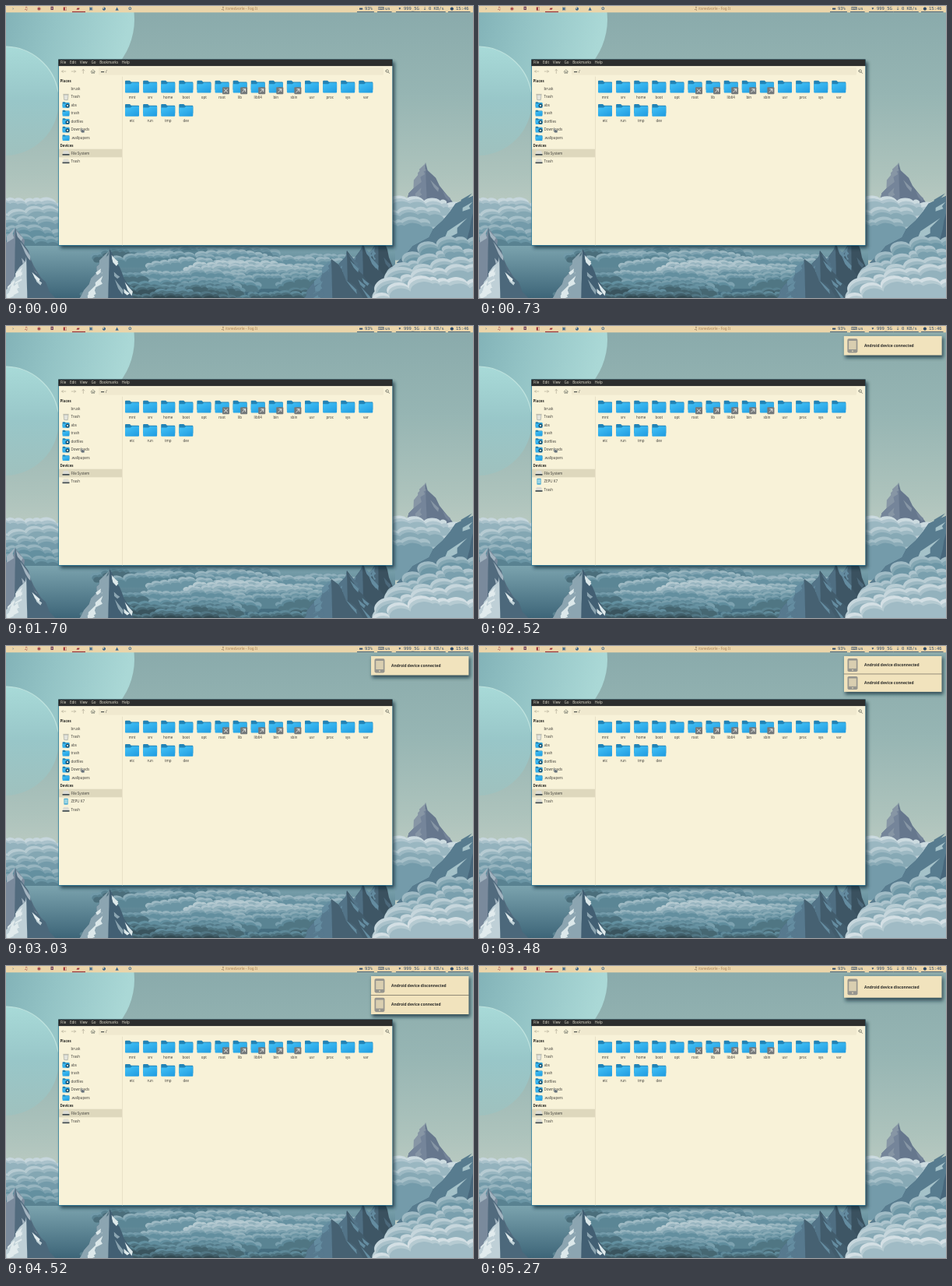
An HTML page that plays this animation: 600 by 375 pixels, repeating every 5.3 s.

```html
<!DOCTYPE html>
<html lang="en">
<head>
<meta charset="utf-8">
<title>File manager on a desktop</title>
<style>
  html, body { margin: 0; width: 100%; height: 100%; overflow: hidden; background: #90b1b1; }
  svg { display: block; width: 100vw; height: 100vh; }
  text { font-family: "Noto Sans", "Open Sans", sans-serif; font-size: 4.5px; fill: #46453f; white-space: pre; }
  .mono { font-family: "DejaVu Sans Mono", "Noto Sans Mono", monospace; font-size: 5.5px; fill: #334e6c; }
  .glyph { font-family: "DejaVu Sans", sans-serif; font-size: 5.5px; text-anchor: middle; }
  .bold { font-weight: 700; fill: #292925; }
  .menu { fill: #d9d5c4; word-spacing: 3.6px; }
  .song { font-size: 4.7px; fill: #a88058; }
  .note { font-weight: 700; font-size: 4.95px; fill: #2c2c2a; }
</style>
</head>
<body>
<svg viewBox="0 0 600 375" preserveAspectRatio="none">
  <defs>
    <linearGradient id="sky" x2="0" y2="1">
      <stop offset="0" stop-color="#89aaab"/><stop offset=".3" stop-color="#96b5b3"/>
      <stop offset=".58" stop-color="#adc3bc"/><stop offset=".75" stop-color="#c0cdc4"/>
    </linearGradient>
    <linearGradient id="planet" x1=".95" y1=".6" x2=".1" y2=".4">
      <stop offset="0" stop-color="#aad8d6"/><stop offset=".6" stop-color="#93c3c5"/><stop offset="1" stop-color="#83b3b8"/>
    </linearGradient>
    <linearGradient id="moon" x2="0" y2="1">
      <stop offset="0" stop-color="#a8dad8"/><stop offset=".5" stop-color="#98c6c8"/><stop offset="1" stop-color="#9fc1be"/>
    </linearGradient>
    <linearGradient id="sea" x2="0" y2="1">
      <stop offset="0" stop-color="#7ba3ae"/><stop offset="1" stop-color="#3d6578"/>
    </linearGradient>
    <linearGradient id="front" x2=".7" y2="1">
      <stop offset="0" stop-color="#45c4f8"/><stop offset="1" stop-color="#239fe2"/>
    </linearGradient>
    <filter id="blur" x="-20%" y="-20%" width="140%" height="140%"><feGaussianBlur stdDeviation="2.2"/></filter>
    <g id="folder">
      <path d="M-9-7q0-1 1-1h5l1.8 1.7H8q1 0 1 1v9H-9z" fill="#2283b5"/>
      <path d="M-9-3.5h7l2-1.8h8q1 0 1 1v11q0 1-1 1H-8q-1 0-1-1z" fill="url(#front)"/>
    </g>
    <g id="phone">
      <rect x="4.5" y="3.2" width="13" height="18.2" rx="1.8" fill="#96958e"/>
      <path d="M6.2 6h9.6v11H6.2z" fill="#d9ceb0"/><circle cx="11" cy="19.2" r="1" fill="#d9ceb0"/>
    </g>
    <g id="disk"><path d="M-3-3h6l1.5 4h-9z" fill="#dcdcd4"/><path d="M-4.5 1h9v1.7h-9z" fill="#3e494f"/></g>
    <g id="trash"><path d="M-3-2.5h6l-.7 6.5h-4.6zM-3.8-3.2h7.6" fill="#e2e3dc" stroke="#8f938c" stroke-width=".5"/></g>
  </defs>
  <g id="wallpaper"></g>
  <g id="topbar"></g>
  <g id="window"></g>
  <g id="stack"></g>
</svg>
<script>
const $ = id => document.getElementById(id);
const LOOP = 5300, CONNECT = 2050, DISCONNECT = 3260, EXPIRE = 5052;
const ROW = 24.5, INK = '#334e6c', RED = '#9a3038';

const path = (d, fill, extra = '') => `<path d="${d}" fill="${fill}" ${extra}/>`;
const line = (d, color, width = .7) => path(d, 'none', `stroke="${color}" stroke-width="${width}" stroke-linecap="round"`);
const rect = (x, y, w, h, fill, extra = '') => `<rect x="${x}" y="${y}" width="${w}" height="${h}" fill="${fill}" ${extra}/>`;
const circle = (x, y, r, fill) => `<circle cx="${x}" cy="${y}" r="${r}" fill="${fill}"/>`;
const text = (x, y, s, attrs = '') => `<text x="${x}" y="${y}" ${attrs}>${s}</text>`;
const glyph = (x, y, s, color) => text(x, y, s, `class="glyph" style="fill:${color}"`);
const use = (id, x, y, scale = 1) => `<use href="#${id}" transform="translate(${x} ${y}) scale(${scale})"/>`;
const poly = (points, fill) => `<polygon points="${points.join(' ')}" fill="${fill}"/>`;
const shadow = (x, y, w, h) => rect(x, y, w, h, '#102b39', 'opacity=".72" filter="url(#blur)"');
const tone = (light, hue = 196, sat = 24) => `hsl(${hue} ${sat}% ${light}%)`;

function random(seed) {
  return () => (seed = seed * 16807 % 2147483647) / 2147483647;
}

// A scalloped heap of cloud, tapering to both ends.
function heap(x0, x1, y, depth, puff, color, seed) {
  const rnd = random(seed);
  let x = x0, cy = y + depth, d = `M${x} ${cy}`;
  while (x < x1) {
    const w = Math.min(puff * (.4 + rnd()), x1 - x + .1);
    const u = Math.min(1, (x + w - x0) / (x1 - x0));
    const next = y + depth * (1 - Math.max(0, Math.sin(Math.PI * u)) ** .4) + (rnd() - .5) * puff * .4;
    d += `a${w * .62} ${w * .42} 0 0 1 ${w} ${next - cy}`;
    x += w;
    cy = next;
  }
  return path(d + `V${y + depth}H${x0}z`, color);
}

// A heap with a bright rim and a darker foot.
function cloud(x0, x1, y, depth, puff, light, seed) {
  return [9, 0, -7].map((lift, i) => heap(x0 + i * 2, x1 - i, y + i * (1 + puff * .15), depth, puff, tone(light + lift), seed)).join('');
}

function slope(x, y, dx, base, rnd, steps = 9) {
  return Array.from({ length: steps + 1 }, (_, i) => {
    const t = i / steps;
    return [x + dx * (t + (i ? rnd() - .5 : 0) * .15), y + (base - y) * t];
  });
}

// A jagged peak: dark body, lit left face and streaks of snow running down both sides.
function peak(x, y, left, right, base, body, lit, snow, seed) {
  const rnd = random(seed);
  const west = slope(x, y, -left, base, rnd), ridge = slope(x, y, (right - left) * .25, base, rnd), east = slope(x, y, right, base, rnd);
  let s = poly([...west, ...[...east].reverse()], body) + poly([...west, ...[...ridge].reverse()], lit);
  for (let i = 0; i < 12; i++) {
    const t = rnd() * .75, side = rnd() < .6 ? -left : right;
    const sx = x + side * t * (.3 + rnd() * .65), sy = y + (base - y) * t;
    const run = (base - y) * (.12 + rnd() * .2), drift = side / (base - y) * run;
    s += poly([[sx, sy], [sx + drift * .5 + 2, sy + run * .45], [sx + drift * .6 + 5, sy + run * .7],
      [sx + drift, sy + run], [sx + drift * .75 - 3, sy + run * .6]], i % 3 ? snow : lit);
  }
  return s;
}

function drawWallpaper() {
  let s = rect(0, 0, 600, 375, 'url(#sky)');
  s += circle(75, 17, 90, 'url(#planet)') + circle(-2, 122, 70, 'url(#moon)');
  s += line('M-2 52A70 70 0 0 1 67 110', '#bfe3de', 1.2);

  const rnd = random(29);
  for (let i = 0; i < 5; i++) s += cloud(-50, 95 + rnd() * 40, 248 + i * 12, 40, 17, 73 - i * 5, 40 + i);

  s += peak(539, 201, 46, 58, 290, '#66778d', '#75859a', '#8796a5', 8);
  for (let i = 0; i < 3; i++) s += cloud(470, 590 - i * 15, 248 + i * 13, 45, 18, 75 - i * 6, 60 + i);
  s += peak(606, 232, 104, 30, 330, '#48677c', '#587c8f', '#a5c2c9', 14);

  s += rect(0, 308, 500, 67, 'url(#sea)');
  for (let i = 0; i < 30; i++) {
    const y = 308 + i * 2.1, x = 95 + rnd() * 260, w = 60 + rnd() * 120;
    s += cloud(x, x + w, y, 12, 11, 64 - Math.abs(y - 326) * .65 - Math.abs(x + w / 2 - 300) * .06 + rnd() * 7, 100 + i);
  }

  s += peak(12, 284, 50, 45, 375, '#526b7e', '#7a8a9c', '#a3b4c0', 21);
  s += peak(26, 322, 34, 40, 380, '#4c687b', '#bfd0d7', '#e1ebed', 5);
  s += peak(133, 312, 42, 34, 380, '#425f73', '#8ca5b1', '#dce8ea', 33);

  for (let i = 0; i < 4; i++) {
    s += peak(478 - i * 20, 292 + i * 11, 42, 48, 385, tone(30 + i * 2, 203), tone(39 + i * 2, 203), tone(51, 200), 70 + i);
  }
  for (let i = 0; i < 5; i++) s += cloud(505 - i * 10, 690, 298 + i * 13, 62, 21, 61 + i * 4, 80 + i);
  $('wallpaper').innerHTML = s;
}

function drawTopbar() {
  let s = rect(0, 0, 600, 8.3, '#ebd5aa');
  [...'›♫◉◘◧▰▣◕▲✿'].forEach((icon, i) => {
    const color = [1, 2, 4, 5].includes(i) ? RED : i === 3 ? '#693d5a' : '#3b668d';
    s += glyph(9 + i * 16.7, 5.4, icon, color);
  });
  s += rect(85, 6.9, 17, 1.2, RED);
  s += glyph(278.5, 5.4, '♫', '#79604d') + text(282, 5.2, 'itsnedvorle - Fog It', 'class="song"');

  const status = [[461, '▬', '93%'], [487, '⌨', 'us'], [511, '▾', '999_5G'], [543, '↓', '0 KB/s'], [578, '●', '15:46']];
  for (const [x, icon, label] of status) {
    s += glyph(x - 5, 5.3, icon, INK) + text(x, 5.3, label, 'class="mono"');
    s += rect(x - 10, 7, label.length * 3.3 + 12, 1.1, '#48657b');
  }
  $('topbar').innerHTML = s;
}

function emblem(x, y, kind) {
  const mark = kind === 'x' ? 'M-2-2l4 4m0-4l-4 4' : 'M-2 2l4-4m-3 0h3v3';
  return `<g transform="translate(${x} ${y})">${rect(-4.5, -4.5, 9, 9, '#74797b', 'rx="1"')}${line(mark, '#f1f1eb', .9)}</g>`;
}

function drawWindow() {
  let s = shadow(70, 72, 429.5, 239);
  s += rect(67.3, 68.5, 429.2, 239.2, '#2a7c9f') + rect(68, 77, 428.3, 230, '#f8f2d8');
  s += rect(67.3, 68.5, 429.2, 8.6, '#2d2e2d');
  s += text(70, 74.4, 'File Edit View Go Bookmarks Help', 'class="menu"');

  const arrow = 'M-2.5 0h5m-5 0l1.5-1.5m-1.5 1.5l1.5 1.5';
  [0, 180, 90].forEach((angle, i) => {
    s += `<g transform="translate(${74.3 + i * 12.5} 84) rotate(${angle})">${line(arrow, '#b2ac97')}</g>`;
  });
  s += line('M109 84.3l2.8-2.5 2.8 2.5M110 84v2.4h1.2v-1.8h1.2v1.8h1.2V84', '#666a60', .6);
  s += rect(119, 79.2, 366, 9.3, '#f0e9cf', 'rx="1"');
  s += rect(122, 84, 4.2, 1.2, '#50544f') + text(128, 85.7, '/');
  s += line('M488 83.5a1.7 1.7 0 1 1 3.4 0a1.7 1.7 0 1 1-3.4 0m2.9 1.2l1.6 1.7', '#555950');
  s += line('M149.5 91v216', '#e1dac0');

  s += text(69.5, 97.6, 'Places', 'class="bold"') + text(69.5, 181.2, 'Devices', 'class="bold"');
  s += rect(68, 183.7, 81, 10.6, '#ded8bd');
  const places = ['brusk', 'Trash', 'abs', 'trash', 'dotfiles', 'Downloads', '.wallpapers'];
  places.forEach((name, i) => {
    const y = 106 + i * 10.55;
    s += text(83.5, y + 1.5, name);
    if (i === 1) s += use('trash', 77, y);
    if (i > 1) s += use('folder', 77, y, .49);
    if (['abs', 'dotfiles', 'Downloads'].includes(name)) s += circle(79, y + 1, 2.5, '#1c4c66') + circle(79, y + 1, 1.1, '#dfebe7');
  });
  s += use('disk', 77, 189) + text(83.5, 190.6, 'File System');
  s += `<g id="device">${rect(74.4, 195.8, 5.3, 8, '#50aed2', 'rx=".8"')}${rect(75.2, 197, 3.7, 5, '#9bd5e4')}${text(83.5, 201.1, 'ZEPU K7')}</g>`;
  s += `<g id="lastRow">${use('disk', 77, 199.5)}${text(83.5, 201.1, 'Trash')}</g>`;

  const files = 'mnt srv home boot opt root lib lib64 bin sbin usr proc sys var etc run tmp dev'.split(' ');
  files.forEach((name, i) => {
    const x = 162 + (i % 14) * 23.1, y = i < 14 ? 103.7 : 134;
    s += use('folder', x, y) + text(x, y + 15.2, name, 'text-anchor="middle"');
    if (i > 4 && i < 10) s += emblem(x + 5, y + 5, name === 'root' ? 'x' : 'link');
  });
  s += path('M96.3 157.2q.8-.7 1.3.2l.5 1.6 2.1.5q1 .3.8 1.3l-.5 2h-3l-2.1-2.4q.2-.9 1.4-.1z', '#66717a', 'stroke="#e6e4d6" stroke-width=".4"');
  $('window').innerHTML = s;
}

function stackMarkup(messages) {
  const h = messages.length * ROW;
  let s = shadow(1.5, 2, 126, h + 1.5) + rect(0, 0, 125.5, h, '#f1e3bd');
  messages.forEach((message, i) => {
    const y = i * ROW;
    s += use('phone', 0, y) + text(26, y + 13.9, `Android device ${message}`, 'class="note"');
    if (i) s += line(`M0 ${y}h125.5`, '#66645a');
  });
  return s;
}

// Remaining distance of a damped spring, from 1 down to 0.
function spring(ms) {
  const t = ms / 1000;
  return Math.exp(-12.5 * t) * (Math.cos(6.6 * t) + 1.89 * Math.sin(6.6 * t));
}

const stacks = { connect: ['connected'], both: ['disconnected', 'connected'], expire: ['disconnected'] };
let shown = '';

function render(t) {
  const plugged = t >= CONNECT && t < DISCONNECT;
  $('device').style.display = plugged ? '' : 'none';
  $('lastRow').setAttribute('transform', `translate(0 ${plugged ? 10.55 : 0})`);

  const state = t < CONNECT ? '' : t < DISCONNECT ? 'connect' : t < EXPIRE ? 'both' : 'expire';
  if (state !== shown) {
    $('stack').innerHTML = state ? stackMarkup(stacks[state]) : '';
    shown = state;
  }
  let sx = 1, sy = 1, opacity = 1;
  if (state === 'connect') {
    sx = sy = 1 - spring(t - CONNECT);
    opacity = Math.min(1, (t - CONNECT) / 150);
  } else if (state === 'both') sy = 1 - spring(t - DISCONNECT) / 2;
  else if (state === 'expire') sy = 1 + spring(t - EXPIRE);
  const x = 469 + 62.75 * (1 - sx), y = 13 + (state === 'connect' ? ROW / 2 * (1 - sy) : 0);
  $('stack').setAttribute('transform', `translate(${x} ${y}) scale(${sx} ${sy})`);
  $('stack').setAttribute('opacity', opacity);
}

drawWallpaper();
drawTopbar();
drawWindow();
render(0);
let start;
requestAnimationFrame(function tick(now) {
  start ??= now;
  render((now - start) % LOOP);
  requestAnimationFrame(tick);
});
</script>
</body>
</html>
```
